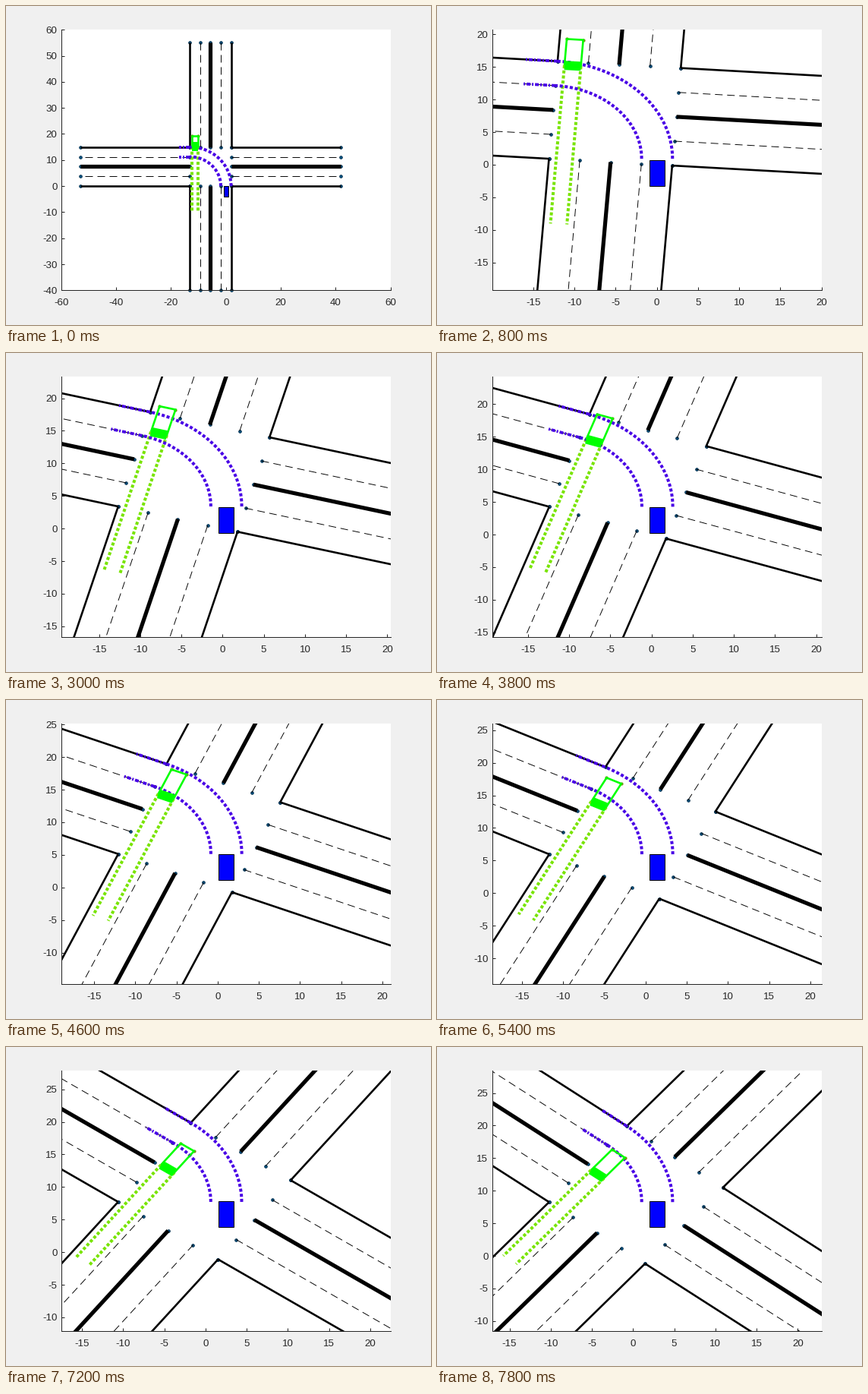
Recreate the animation shown at these times as a matplotlib script. Size 560 by 420 pixels, loop 8 s.

```python
import numpy as np
import matplotlib.pyplot as plt
from matplotlib.animation import FuncAnimation
from matplotlib.ticker import MultipleLocator

plt.rcParams["font.family"] = "Liberation Sans"
plt.rcParams["font.size"] = 9.6
plt.rcParams["axes.unicode_minus"] = False

W, H = 560, 420
PX = 0.72                    # points per pixel at 100 dpi
FRAMES = 40
LANE = 3.75
ARM = 40
LEFT, RIGHT = -3.5 * LANE, 0.5 * LANE
BOTTOM, TOP = 0, 4 * LANE
TURN_R = 13.68               # radius driven by the blue car
VIEW = 20
INK = "#262626"
PURPLE, LEAF, LIME = "#4800e6", "#78e400", "#00ff00"

fig = plt.figure(figsize=(W / 100, H / 100), dpi=100, facecolor="#f0f0f0")
ax = fig.add_axes([72.8 / W, 45.6 / H, 434 / W, 343.2 / H])
for side in ("top", "right"):
    ax.spines[side].set_visible(False)
for side in ("left", "bottom"):
    ax.spines[side].set_color(INK)
    ax.spines[side].set_linewidth(PX)
    ax.spines[side].set_zorder(9)
ax.tick_params(direction="in", length=4.3 * PX, width=PX,
               color=INK, labelcolor=INK)
ax.tick_params(axis="x", pad=10.2 * PX)
ax.tick_params(axis="y", pad=5.4 * PX)


def rotate(pts, deg):
    """Turn points clockwise about the world origin."""
    a = np.radians(deg)
    x, y = np.asarray(pts, float).T
    return x * np.cos(a) + y * np.sin(a), y * np.cos(a) - x * np.sin(a)


def stroke(color, width, dash=None, z=3):
    line, = ax.plot([], [], color=color, lw=width * PX, zorder=z,
                    solid_capstyle="butt", dash_capstyle="butt",
                    solid_joinstyle="miter")
    if dash:
        line.set_linestyle((0, [d / width for d in dash]))
    return line


def arm_lines():
    """Five lane lines on each of the four arms, from the crossing outward."""
    arms = []
    for i in range(5):
        x, y = LEFT + i * LANE, i * LANE
        for seg in ([(x, TOP), (x, TOP + ARM)],
                    [(x, BOTTOM), (x, BOTTOM - ARM)],
                    [(LEFT, y), (LEFT - ARM, y)],
                    [(RIGHT, y), (RIGHT + ARM, y)]):
            arms.append((i, seg))
    return arms


def lane_stroke(i):
    if i in (0, 4):
        return stroke("black", 2.6)
    if i == 2:
        return stroke("black", 5.2)
    return stroke("black", 0.95, (10, 6))


roads = [(seg, lane_stroke(i)) for i, seg in arm_lines()]
ends = np.array([p for seg, _ in roads for p in seg])
dots, = ax.plot([], [], "o", ms=3.8 * PX, mfc="#06507f", mec="#042c48",
                mew=0.7 * PX, zorder=2, clip_on=False)

DOTTED = (4, 2.7)
tracks = [(x, stroke(LEAF, 4, DOTTED, 4)) for x in (-12.25, -10.25)]
bends = [(r, stroke(PURPLE, 4, DOTTED, 5), stroke(PURPLE, 3.8, (5, 2, 2, 2), 5))
         for r in (3 * LANE, 4 * LANE)]

tail, = ax.plot([], [], "o", ms=4.2 * PX, color="#7d8a10", mew=0, zorder=6)
body = stroke(LIME, 2.6, z=7)
nose = stroke(LIME, 12, z=7)
ego = plt.Rectangle((0, 0), 1.8, 4, fc="blue", ec="black", lw=PX, zorder=8)
ax.add_patch(ego)


def set_view(n, cx, cy):
    if n == 0:
        ax.set_xlim(-60, 60)
        ax.set_ylim(-40, 60)
    else:
        ax.set_xlim(cx - VIEW, cx + VIEW)
        ax.set_ylim(cy - VIEW, cy + VIEW)
    ax.xaxis.set_major_locator(MultipleLocator(5 if n else 20))
    ax.yaxis.set_major_locator(MultipleLocator(5 if n else 10))


def update(n):
    # the scene turns one degree per step; the car follows one step behind
    a = np.radians(max(n - 1, 0))
    cx, cy = TURN_R * (1 - np.cos(a)), TURN_R * np.sin(a)
    set_view(n, cx, cy)
    ego.set_xy((cx - 0.9, cy - 4))

    for seg, line in roads:
        line.set_data(*rotate(seg, n))
    x, y = rotate(ends, n)
    (x0, x1), (y0, y1) = ax.get_xlim(), ax.get_ylim()
    seen = (x >= x0) & (x <= x1) & (y >= y0) & (y <= y1)
    dots.set_data(x[seen], y[seen])

    t = np.radians(np.linspace(n, 90, 80))
    for r, arc, run in bends:
        arc.set_data(*rotate(np.c_[LEFT + r * np.cos(t), r * np.sin(t)], n))
        run.set_data(*rotate([(LEFT, r), (LEFT - 4, r)], n))

    rear = 19.32 - 0.211 * n
    front = rear - 4.05
    for x, line in tracks:
        line.set_data(*rotate([(x, front), (x, -9.9)], n))
    xl, xr = (x for x, _ in tracks)
    box = [(xl, front), (xl, rear), (xr, rear), (xr, front), (xl, front)]
    body.set_data(*rotate(box, n))
    tail.set_data(*rotate(box[1:3], n))
    nose.set_data(*rotate([box[0], box[3]], n))
    return []


anim = FuncAnimation(fig, update, frames=FRAMES, interval=200,
                     init_func=lambda: update(0), repeat=True, repeat_delay=0)
plt.show()
```
